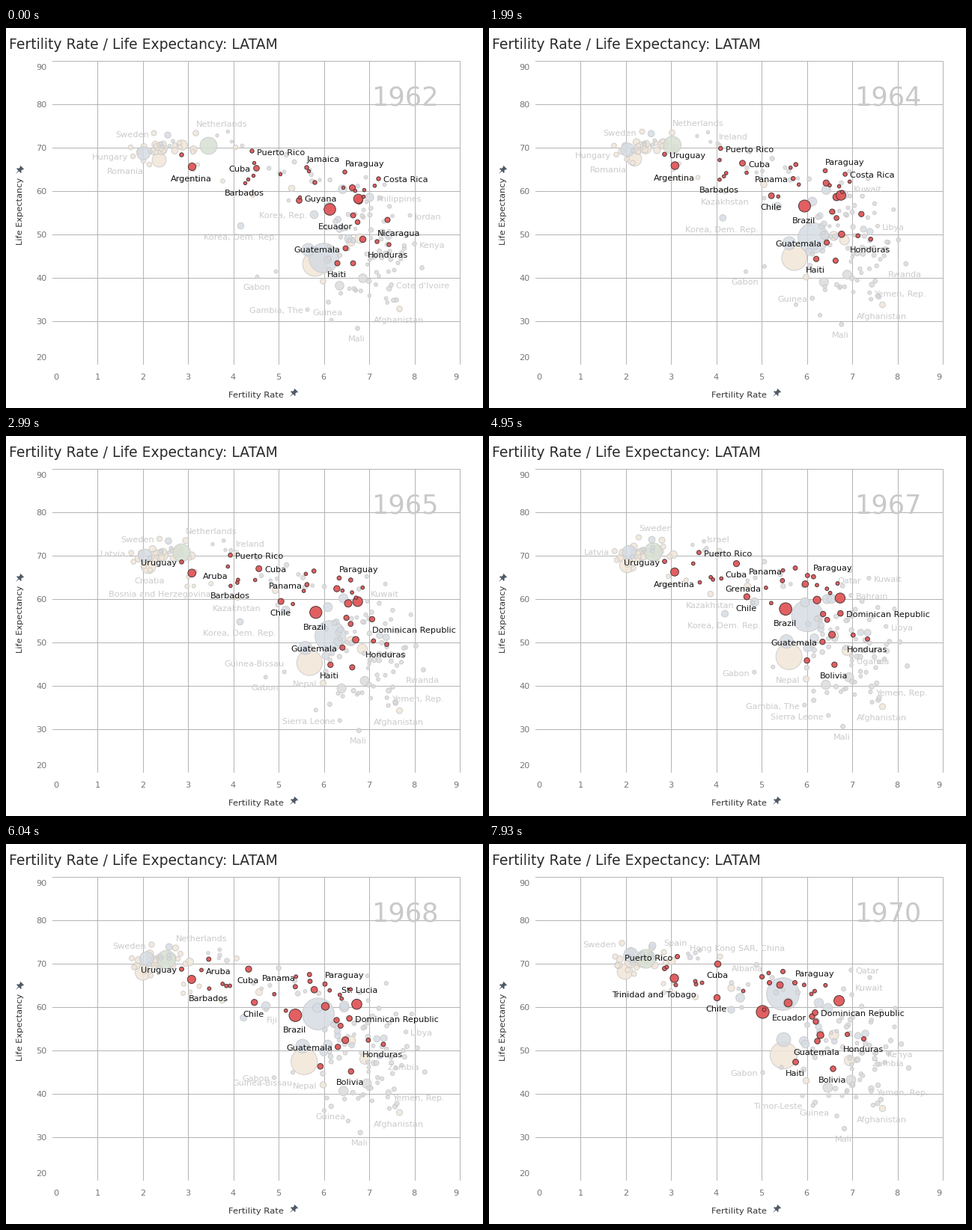
Write a matplotlib script that moves like this. It is 637x508 px and loops after 8 s.

```python
import numpy as np
import matplotlib.pyplot as plt
from matplotlib.animation import FuncAnimation
from matplotlib.patches import Polygon

W, H, DPI = 637, 508, 100
STEP, LOOP, SPAN = 25, 8000, 8
CHANGES = (970, 1990, 2990, 3980, 4950, 6040, 7070, 7930)
RED, BLUE, PEACH, MAUVE, GREEN = "#e15759", "#d5dce3", "#f1e6d8", "#dcdbdd", "#d7e0d3"

# Key points: radius, first x, y, last x, y and, where the path curves, its sideways bend.
# Families get smaller at a growing pace here ...
LATE = {
    "Brazil": (8, 433, 243, 366, 225),
    "Argentina": (5.3, 249, 186, 248, 180),
    "Colombia": (5, 472, 231, 400, 213, 6),
    "Venezuela": (4.2, 463, 214, 389, 189),
    "Peru": (4.4, 477, 283, 443, 256),
    "Chile": (4, 392, 231, 305, 206),
    "Ecuador": (3.6, 464, 251, 432, 231),
    "Bolivia": (3.6, 464, 315, 460, 301),
    "Paraguay": (2.9, 453, 193, 409, 186, 5),
    "Mexico": (6.5, 471, 229, 468, 210),
    "Guatemala": (3.6, 454, 295, 439, 264),
    "El Salvador": (3.4, 470, 260, 437, 238),
    "Honduras": (2.9, 512, 290, 501, 261),
    "Nicaragua": (2.9, 496, 286, 479, 255),
    "Costa Rica": (2.9, 498, 202, 365, 178),
    "Panama": (2.9, 413, 207, 375, 186),
    "Dominican Republic": (3.7, 510, 257, 436, 226),
    "Haiti": (3.7, 443, 315, 410, 292),
    "Barbados": (2.4, 320, 208, 250, 189),
}
# ... and at an even pace here.
EVEN = {
    "Uruguay": (2.9, 235, 170, 235, 167),
    "Guyana": (2.4, 393, 227, 368, 222),
    "Cuba": (4, 335, 188, 306, 161, 15),
    "Puerto Rico": (2.9, 329, 165, 252, 151),
    "Jamaica": (2.9, 402, 187, 393, 171, 14),
    "Bahamas": (2.4, 405, 192, 374, 173, 8),
    "Aruba": (2.4, 332, 181, 238, 165),
    "Trinidad and Tobago": (2.4, 367, 196, 277, 188),
    "Grenada": (2.4, 451, 214, 340, 197, -12),
    "St. Lucia": (2.4, 478, 226, 431, 201, 8),
}
ASIA = {
    "China": (20, 425, 308, 393, 201, 22),
    "Indonesia": (8.7, 404, 297, 394, 262),
    "Japan": (9, 184, 168, 190, 149),
    "Philippines": (5.8, 486, 227, 441, 213),
    "Vietnam": (6, 450, 216, 453, 220),
    "Thailand": (6, 432, 239, 400, 213, 11),
    "Turkey": (5.6, 458, 282, 421, 264),
    "Myanmar": (5, 430, 310, 423, 268),
    "Korea, Rep.": (5.5, 412, 250, 336, 206, -10),
    "Korea, Dem. Rep.": (4.4, 314, 265, 324, 222, -5),
    "Hong Kong SAR, China": (3.2, 375, 170, 269, 152),
}
EUROPE = {
    "India": (16.6, 413, 316, 394, 283),
    "Pakistan": (6.2, 461, 286, 461, 256),
    "Bangladesh": (6.6, 473, 282, 482, 290),
    "Sri Lanka": (4.4, 382, 215, 324, 193),
    "Russia": (9.6, 205, 177, 182, 171, -6),
    "Germany": (8, 208, 162, 190, 157, 8),
    "Britain": (7, 236, 157, 210, 152, 5),
    "Kazakhstan": (3.8, 330, 223, 276, 205),
    "Netherlands": (4, 254, 141, 218, 139),
    "Sweden": (3.6, 198, 141, 178, 133, 16),
    "Bosnia and Herzegovina": (3, 290, 205, 248, 186),
}
NORTH = {"United States": (11.6, 271, 158, 210, 154, -14)}

# Neighbours that move together: colour, radius, shared drift, first positions.
REGIONS = [
    (MAUVE, 6, (7, -19), {"Nigeria": (446, 345), "Ethiopia": (477, 335)}),
    (MAUVE, 3, (5, -21), {
        "Kenya": (546, 289), "Rwanda": (556, 321), "Uganda": (511, 301), "Zambia": (529, 301),
        "Guinea": (431, 367), "Mali": (470, 402), "Cote d'Ivoire": (515, 344)}),
    (MAUVE, 2.6, (30, -27), {
        "Gabon": (336, 333), "Guinea-Bissau": (361, 326), "Gambia, The": (403, 377),
        "Sierra Leone": (435, 391), "Libya": (512, 272)}),
    (MAUVE, 2.6, (3, -31), {
        "Yemen, Rep.": (508, 362), "Jordan": (540, 251), "Kuwait": (506, 210),
        "Qatar": (481, 200), "Bahrain": (482, 233)}),
    (PEACH, 4, (0, -22), {"Afghanistan": (526, 376), "Nepal": (424, 339)}),
    (PEACH, 3.4, (2, -9), {
        "Hungary": (170, 172), "Latvia": (167, 160), "Romania": (184, 178),
        "Croatia": (192, 183), "Ireland": (307, 160), "Spain": (232, 154)}),
    (MAUVE, 2.6, (-40, -12), {
        "Albania": (406, 190), "Fiji": (378, 231), "Israel": (316, 158),
        "Timor-Leste": (459, 349)}),
]

# side of the dot on which each label sits, per year
LABELS = [
    dict(r="Puerto Rico;Costa Rica;Guyana;Philippines;Jordan;Kenya;Cote d'Ivoire",
         l="Cuba;Guatemala;Sweden;Hungary;Korea, Rep.;Gambia, The",
         b="Argentina;Barbados;Honduras;Haiti;Korea, Dem. Rep.;Gabon;Guinea;Mali;Afghanistan",
         tr="Jamaica;Paraguay;Nicaragua;Netherlands", bl="Ecuador;Romania"),
    dict(r="Puerto Rico;Costa Rica;Philippines;Jordan;Yemen, Rep.",
         l="Cuba;Panama;Guatemala;Sweden;Hungary;Gambia, The",
         b="Argentina;Barbados;Chile;Brazil;Honduras;Haiti;Korea, Dem. Rep.;Gabon;Rwanda;Mali;"
           "Afghanistan",
         tr="Paraguay;Netherlands", bl="Romania"),
    dict(r="Uruguay;Puerto Rico;Cuba;Costa Rica;Libya;Yemen, Rep.",
         l="Panama;Guatemala;Sweden;Hungary;Guinea",
         b="Argentina;Barbados;Chile;Brazil;Honduras;Haiti;Kazakhstan;Kuwait;"
           "Korea, Dem. Rep.;Gabon;Rwanda;Mali;Afghanistan",
         tr="Paraguay;Netherlands;Ireland", bl="Romania"),
    dict(r="Puerto Rico;Cuba;Yemen, Rep.",
         l="Uruguay;Panama;Guatemala;Sweden;Latvia;Nepal;Sierra Leone",
         b="Barbados;Chile;Brazil;Honduras;Haiti;Croatia;Kazakhstan;Korea, Dem. Rep.;"
           "Kuwait;Gabon;Rwanda;Afghanistan;Mali",
         tr="Paraguay;Netherlands;Ireland", bl="Aruba;Bosnia and Herzegovina",
         br="Dominican Republic", tl="Guinea-Bissau"),
    dict(r="Puerto Rico;Dominican Republic;Kuwait;Libya;Yemen, Rep.",
         l="Uruguay;Guatemala;Latvia;Gabon;Nepal;Sierra Leone",
         b="Argentina;Cuba;Barbados;Chile;Brazil;Honduras;Haiti;Kazakhstan;"
           "Korea, Dem. Rep.;Afghanistan;Mali",
         tr="Paraguay;Sweden;Israel", tl="Panama"),
    dict(r="Puerto Rico;Dominican Republic;Kuwait;Bahrain;Libya;Yemen, Rep.",
         l="Uruguay;Grenada;Guatemala;Latvia;Gabon;Nepal;Gambia, The;Sierra Leone",
         b="Argentina;Cuba;Chile;Brazil;Honduras;Bolivia;Kazakhstan;Korea, Dem. Rep.;"
           "Qatar;Uganda;Afghanistan;Mali",
         tr="Paraguay;Sweden;Israel", tl="Panama"),
    dict(r="Aruba;Dominican Republic;Libya;Yemen, Rep.",
         l="Uruguay;Guatemala;Sweden;Gabon;Nepal",
         b="Cuba;Barbados;Chile;Brazil;Honduras;Bolivia;Zambia;Guinea;Afghanistan;Mali",
         tr="Paraguay;St. Lucia;Netherlands", tl="Panama", br="Fiji", bl="Guinea-Bissau"),
    dict(r="Dominican Republic;Qatar;Yemen, Rep.",
         l="Puerto Rico;Guatemala;Sweden;Gabon",
         b="Cuba;Barbados;Chile;Brazil;Honduras;Bolivia;Kuwait;Zambia;Guinea;Afghanistan;Mali",
         tr="Paraguay;Hong Kong SAR, China", tl="Panama", bl="Guinea-Bissau"),
    dict(r="Dominican Republic;Qatar;Yemen, Rep.",
         l="Puerto Rico;Ecuador;Sweden;Gabon",
         b="Cuba;Chile;Guatemala;Honduras;Haiti;Bolivia;Kuwait;Kenya;Zambia;Guinea;"
           "Afghanistan;Mali",
         tr="Paraguay;Spain;Hong Kong SAR, China", tl="Albania",
         bl="Trinidad and Tobago;Timor-Leste"),
]
# side: x direction, y direction, text alignment
SIDES = dict(r=(1, 0, "left"), l=(-1, 0, "right"), b=(0, 1, "center"), tr=(0, -1, "left"),
             tl=(0, -1, "right"), br=(0, 1, "left"), bl=(0, 1, "right"))

fig = plt.figure(figsize=(W / DPI, H / DPI), dpi=DPI, facecolor="white")
ax = fig.add_axes([0, 0, 1, 1])
ax.set_xlim(0.5, W + 0.5)
ax.set_ylim(H + 0.5, 0.5)
ax.axis("off")


def px(n):
    return n * 72 / DPI


def write(x, y, s, size=11.2, color="#757575", ha="center", **kw):
    return ax.text(x, y, s, fontsize=px(size), color=color, ha=ha, va="baseline",
                   family="DejaVu Sans", **kw)


class Dot:
    def __init__(self, color, r, x0, y0, x1, y1, bend=0, power=1):
        self.color, self.r, self.bend, self.power = color, r, bend, power
        self.start, self.end = (x0, y0), (x1, y1)

    def at(self, year):
        u = year / SPAN
        (x0, y0), (x1, y1) = self.start, self.end
        x = x0 + (x1 - x0) * u ** self.power + self.bend * 4 * u * (1 - u)
        return x, y0 + (y1 - y0) * u, self.r * (1 + 0.1 * u)


def pin(cx, cy):
    half = [(0.7, 1), (4.8, 1), (4.8, -0.5), (2.6, -2), (2.6, -5.3), (3.8, -5.3), (3.8, -7)]
    pts = np.array([(0, 8)] + half + [(-x, y) for x, y in half[::-1]]) * 0.85
    x, y = pts.T
    ax.add_patch(Polygon(np.c_[cx + (x - y) * 0.707, cy + (x + y) * 0.707],
                         fc="#4f5967", ec="none"))


def draw_axes():
    write(5, 29, "Fertility Rate / Life Expectancy: LATAM", 18.8, "#2b2b2b", "left")
    for i in range(10):
        x = 62 + 60.45 * i
        if i:
            ax.plot([round(x)] * 2, [44, 449], color="#b4b4b4", lw=px(1), zorder=1)
        write({0: 67, 9: 601}.get(i, x), 470, str(i))
    for i in range(8):
        y = 44 + 58 * i
        if i < 7:
            ax.plot([62, 606], [y, y], color="#b4b4b4", lw=px(1), zorder=1)
        write(55, {0: 53, 7: 441}.get(i, y) + 4, str(90 - 10 * i), ha="right")
    write(334.5, 494, "Fertility Rate", 11.5, "#333333")
    ax.text(19.5, 245, "Life Expectancy", fontsize=px(11.4), color="#333333", rotation=90,
            ha="center", va="center", family="DejaVu Sans")
    pin(384, 489)
    pin(18, 191)


rng = np.random.default_rng(12)


def cloud(n, mean, spread, drift, radii, color):
    """Small dots scattered about a point, each drifting in its own way."""
    start = mean + np.clip(rng.normal(size=(n, 2)), -1.8, 1.8) * spread
    end = start + drift + rng.normal(0, 4, (n, 2))
    return [Dot(color, r, *a, *b) for r, a, b in zip(rng.uniform(*radii, n), start, end)]


reds = {name: Dot(RED, *key, power=1.3) if len(key) == 5 else Dot(RED, *key, 1.3)
        for name, key in LATE.items()}
reds.update((name, Dot(RED, *key)) for name, key in EVEN.items())
named = {name: Dot(color, *key)
         for color, group in ((GREEN, NORTH), (BLUE, ASIA), (PEACH, EUROPE))
         for name, key in group.items()}
for color, r, (dx, dy), places in REGIONS:
    for name, (x, y) in places.items():
        named[name] = Dot(color, r, x, y, x + dx, y + dy)

red_dots = list(reds.values())
red_dots += cloud(3, (467, 215), (16, 3), (-43, -24), (2.4, 2.5), RED)
red_dots += [Dot(RED, 2.4, 331 - 7 * i, 198 + 5 * i, 276 + 9 * i, 184 + 2 * i)
             for i in range(2)]

greys = list(named.values())
greys += cloud(16, (213, 160), (21, 7), (-6, -6), (3, 5.2), PEACH)
greys += cloud(6, (222, 158), (20, 8), (-6, -6), (2.5, 4.5), BLUE)
greys += cloud(4, (258, 193), (12, 6), (-12, -5), (2.4, 3), PEACH)
greys += cloud(3, (298, 146), (12, 6), (-18, 2), (2.2, 2.8), MAUVE)
greys += cloud(8, (398, 192), (32, 14), (-25, -8), (2.2, 3.2), MAUVE)
greys += cloud(12, (485, 242), (24, 18), (4, -14), (2.2, 3.2), MAUVE)
greys += cloud(36, (482, 304), (28, 25), (-2, -20), (2.3, 3.6), MAUVE)
greys += cloud(8, (468, 285), (24, 16), (-6, -20), (3, 4.8), BLUE)
greys += cloud(8, (475, 358), (26, 11), (5, -20), (2.3, 3.2), MAUVE)
greys.sort(key=lambda dot: (dot.color != PEACH, -dot.r))


def scatter(dots, year, edge, alpha, z):
    x, y, r = np.array([dot.at(year) for dot in dots]).T
    return ax.scatter(x, y, s=px(2 * r - 0.4) ** 2, c=[dot.color for dot in dots],
                      edgecolors=edge, linewidths=px(1), alpha=alpha, zorder=z)


def build_year(year):
    parts = [write(533.5, 104, str(1962 + year), 35, "#c9c9c9", zorder=2),
             scatter(greys, year, "#c9c8c8", 0.85, 3),
             scatter(red_dots, year, "#4a3434", 0.95, 5)]
    for side, names in LABELS[year].items():
        sx, sy, ha = SIDES[side]
        for name in names.split(";"):
            red = name in reds
            x, y, r = (reds if red else named)[name].at(year)
            dy = 1 if sy == 0 else sy * (r + (10.5 if sy > 0 else 9))
            x += sx * (r + 3.5) - (side == "b")
            parts.append(write(x, y + dy + 4, name, color="#111111" if red else "#cbcbcb",
                               ha=ha, zorder=6 if red else 4))
    return parts


draw_axes()
years = [build_year(year) for year in range(SPAN + 1)]


def show(frame):
    now = sum((frame + 1) * STEP > c for c in CHANGES)
    for year, parts in enumerate(years):
        for part in parts:
            part.set_visible(year == now)
    return years[now]


anim = FuncAnimation(fig, show, frames=LOOP // STEP, interval=STEP, init_func=lambda: show(0),
                     repeat=True, repeat_delay=0, blit=False)
plt.show()
```
